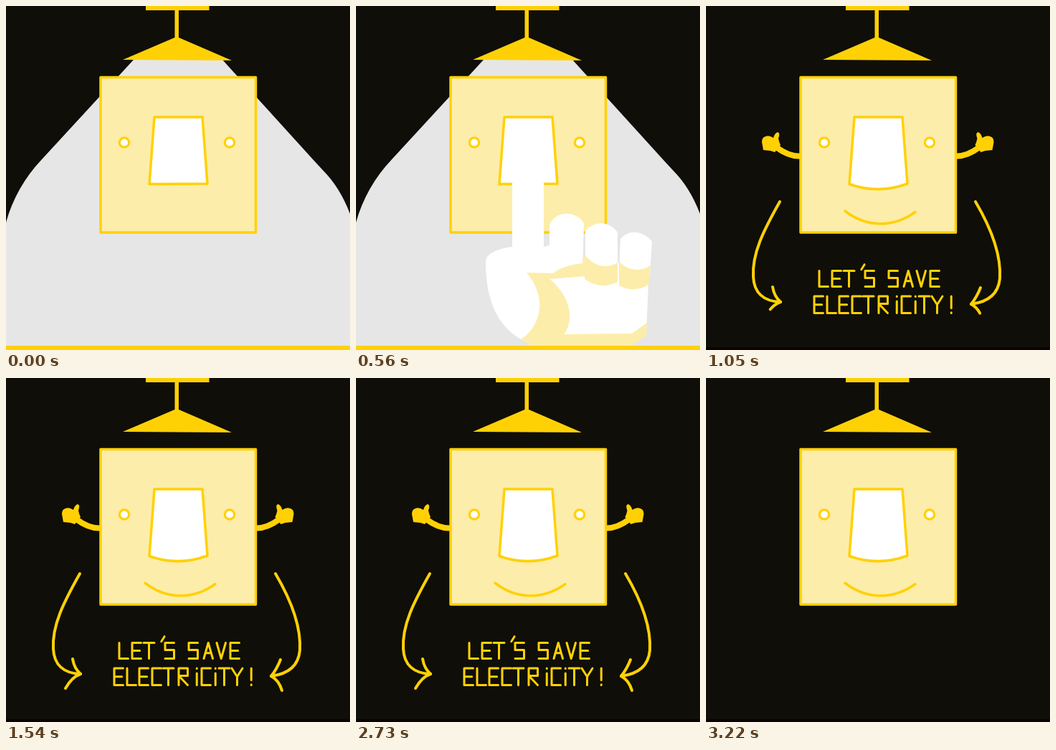
An HTML page with a canvas that plays this animation: 480x480 px, repeating every 3290 ms.

```html
<!DOCTYPE html>
<html lang="en">
<head>
<meta charset="utf-8">
<title>Let's save electricity!</title>
<style>
html, body { margin: 0; width: 100%; height: 100%; overflow: hidden; background: #0f0e09; }
canvas { display: block; width: 100vw; height: 100vh; }
</style>
</head>
<body>
<canvas id="stage" width="480" height="480" role="img" aria-label="Let's save electricity!"></canvas>
<script>
const ctx = document.getElementById('stage').getContext('2d');
const DARK = '#0f0e09', GOLD = '#ffd105', PALE = '#fdedaa', LIGHT = '#e6e6e6', WHITE = '#fff';
const STEP = 70, COUNT = 47;
const clamp = v => Math.max(0, Math.min(1, v));

function fill(d, color) {
  ctx.fillStyle = color;
  ctx.fill(new Path2D(d));
}
function stroke(d, width) {
  ctx.strokeStyle = GOLD;
  ctx.lineWidth = width;
  ctx.stroke(new Path2D(d));
}
// Strokes the first part of a path of roughly the given length.
function strokePart(d, width, length, part) {
  if (part <= 0) return;
  ctx.setLineDash(part < 1 ? [length * part, 999] : []);
  stroke(d, width);
  ctx.setLineDash([]);
}

function drawRoom(lit) {
  ctx.fillStyle = DARK;
  ctx.fillRect(0, 0, 480, 480);
  if (lit) fill('M178 75 L50 214 Q14 252 0 302 V480 H480 V290 Q466 253 442 229 L430 216 L302 75Z', LIGHT);
}

function drawFloor(lit) {
  ctx.fillStyle = lit ? GOLD : '#0a0203';
  const top = lit ? 474 : 476;
  ctx.fillRect(0, top, 480, 480 - top);
}

function drawLamp() {
  fill('M195 0H283.5V6H241V44L315 76L163 75L235.5 44V6H195Z', GOLD);
}

function drawPlate(lit, smile) {
  const face = 'M132 99.5H348.5V316H132Z';
  fill(face, PALE);
  stroke(face, 3.5);
  for (const x of [165, 312]) {
    ctx.beginPath();
    ctx.arc(x, 190.5, 6.7, 0, 7);
    ctx.fillStyle = WHITE;
    ctx.fill();
    ctx.lineWidth = 3.2;
    ctx.stroke();
  }
  const rocker = 'M207 155H274L281 248' + (lit ? 'L200 248.5Z' : 'Q240 263 200 248.5Z');
  fill(rocker, WHITE);
  stroke(rocker, 3.5);
  strokePart('M194 286C225 310 262 309 292 287.5', 3.5, 106, smile);
}

function drawArm(raised, out) {
  ctx.save();
  ctx.translate(131 + 60 * (1 - out), 210);
  ctx.rotate(raised ? 0.087 : 0);
  ctx.translate(-131, -210);
  stroke('M136 209Q118 212 98 197', 8);
  fill('M78 190Q78 183 83 182Q88 180 94 184Q96 177 100 176Q104 177 101 185Q102 190 104 194L96 204L90 202L80 201Z', GOLD);
  ctx.restore();
}

function drawArms(raised, out) {
  if (out <= 0) return;
  drawArm(raised, out);
  ctx.save();
  ctx.translate(479.5, 0);
  ctx.scale(-1, 1);
  drawArm(raised, out);
  ctx.restore();
}

const arrows = [
  { line: 'M103 273C81 312 64 345 66 378C67 400 80 412 104 413', tick: 'M93 392Q95 405 104 413', barb: 'M104 413Q92 417 83 433' },
  { line: 'M376 273C399 312 412 347 410 380C408 402 394 413 370 416', tick: 'M383 393Q378 406 370 416', barb: 'M370 416Q381 422 385 436' }
];

function drawArrows(f) {
  for (const a of arrows) {
    strokePart(a.line, 4, 164, clamp((f - 11) / 3));
    strokePart(a.tick, 4, 24, clamp(f - 13));
    strokePart(a.barb, 4, 29, f < 15 ? 0 : f < 16 ? 0.62 : 1);
  }
}

// Hand lettering on a unit box.
const glyphs = {
  L: 'M0 0 0 1 1 1', E: 'M1 0 0 0 0 1 1 1M0 .5 .85 .5', T: 'M0 0 1 0M.5 0 .5 1',
  S: 'M1 0 0 0 0 .45 1 .45 1 1 0 1', A: 'M0 1 .5 0 1 1M.2 .65 .8 .65', V: 'M0 0 .5 1 1 0',
  C: 'M1 0 0 0 0 1 1 1', R: 'M0 1 0 0 1 0 1 .45 0 .45 1 1', Y: 'M0 0 .5 .5 1 0M.5 .5 .5 1',
  i: 'M.5 .3 .5 1M.5 0 .5 .02', '!': 'M.5 0 .5 .7M.5 .97 .5 1', "'": 'M.65 -.4 .3 -.08'
};

function letter(ch, x, y, w, h) {
  const path = new Path2D();
  path.addPath(new Path2D(glyphs[ch]), new DOMMatrix([w, 0, 0, h, x, y]));
  ctx.lineWidth = 3;
  ctx.stroke(path);
}
function lettering(text, xs, y, h) {
  [...text].forEach((ch, i) => letter(ch, xs[i], y, ch === 'T' || ch === 'Y' ? 15 : 12.5, h));
}

function drawWords() {
  ctx.strokeStyle = GOLD;
  lettering("LET'SSAVE", [158, 176, 192, 213, 222, 255, 276, 294, 313], 369.5, 22);
  lettering('ELECTRiCiTY!', [151, 169, 186, 204, 219, 241, 260, 273, 286, 297, 315, 336], 405, 23.5);
}

const palm = 'M218 336C200 338 180 345 181 358C181 400 192 445 232 466L245 474L385 474L405 459L409 360L270 356L270 334L262 336Z';
const fingers = [
  'M218 350L218 226C219 193 261 193 262 226L262 350Z',
  'M270 365L270 306C278 284 308 286 318 303L316 370Z',
  'M320 370L320 314C332 299 354 300 365 316L365 375Z',
  'M367 375L369 325C380 311 402 313 413 329L410 375Z'
];
const shades = [
  'M238 372L275 373Q288 362 316 359L319 347L321 377L270 381C300 405 305 440 290 458L385 457L406 442L405 460L385 474L245 474L230 465C255 450 270 410 238 372Z',
  'M319 347Q340 372 365 358L365 385Q342 397 319 381Z',
  'M367 357Q388 376 411 362L408 389Q388 401 367 390Z'
];

// Near the viewer the hand is larger and spreads toward its top; pressing flattens it.
function bend(d, press, drop) {
  return d.replace(/([\d.]+) ([\d.]+)/g, (_, a, b) => {
    const x = +a, y = +b, far = 1 - press;
    const wide = 240 + (x - 240) * (1.26 - 0.0012 * (y - 248));
    const low = 0.88 * y + 105;
    return (x + (wide - x) * far).toFixed(2) + ' ' + (y + (low - y) * far + drop).toFixed(2);
  });
}

// Press amount and drop below the reaching pose, by step.
const reach = {
  4: [0, 150], 5: [0, 80], 6: [0, 0], 7: [0.6, 0], 8: [1, 0], 9: [0.5, 0], 10: [0, 80],
  41: [0, 90], 42: [0, 0], 43: [0.6, 0], 44: [1, 0], 45: [0, 90]
};

function drawHand(f) {
  if (!reach[f]) return;
  for (const d of [palm, ...fingers]) fill(bend(d, ...reach[f]), WHITE);
  for (const d of shades) fill(bend(d, ...reach[f]), PALE);
}

function draw(f) {
  const lit = f < 9;
  drawRoom(lit);
  drawLamp();
  const out = f < 30 ? clamp((f - 11) / 2) : clamp((46 - f) / 2);
  const waving = f > 15 && f < 41;
  drawArms(waving && ((f - 15) % 4 === 1 || (f - 15) % 4 === 2), out);
  drawPlate(lit, clamp((f - 9) / 2));
  if (f >= 12 && f < 41) {
    drawArrows(f);
    if (f >= 13) drawWords();
  }
  drawHand(f);
  drawFloor(lit);
}

ctx.lineCap = ctx.lineJoin = 'round';
const start = performance.now();
function tick(now) {
  draw(Math.floor(Math.max(0, now - start) / STEP) % COUNT);
  requestAnimationFrame(tick);
}
draw(0);
requestAnimationFrame(tick);
</script>
</body>
</html>
```
